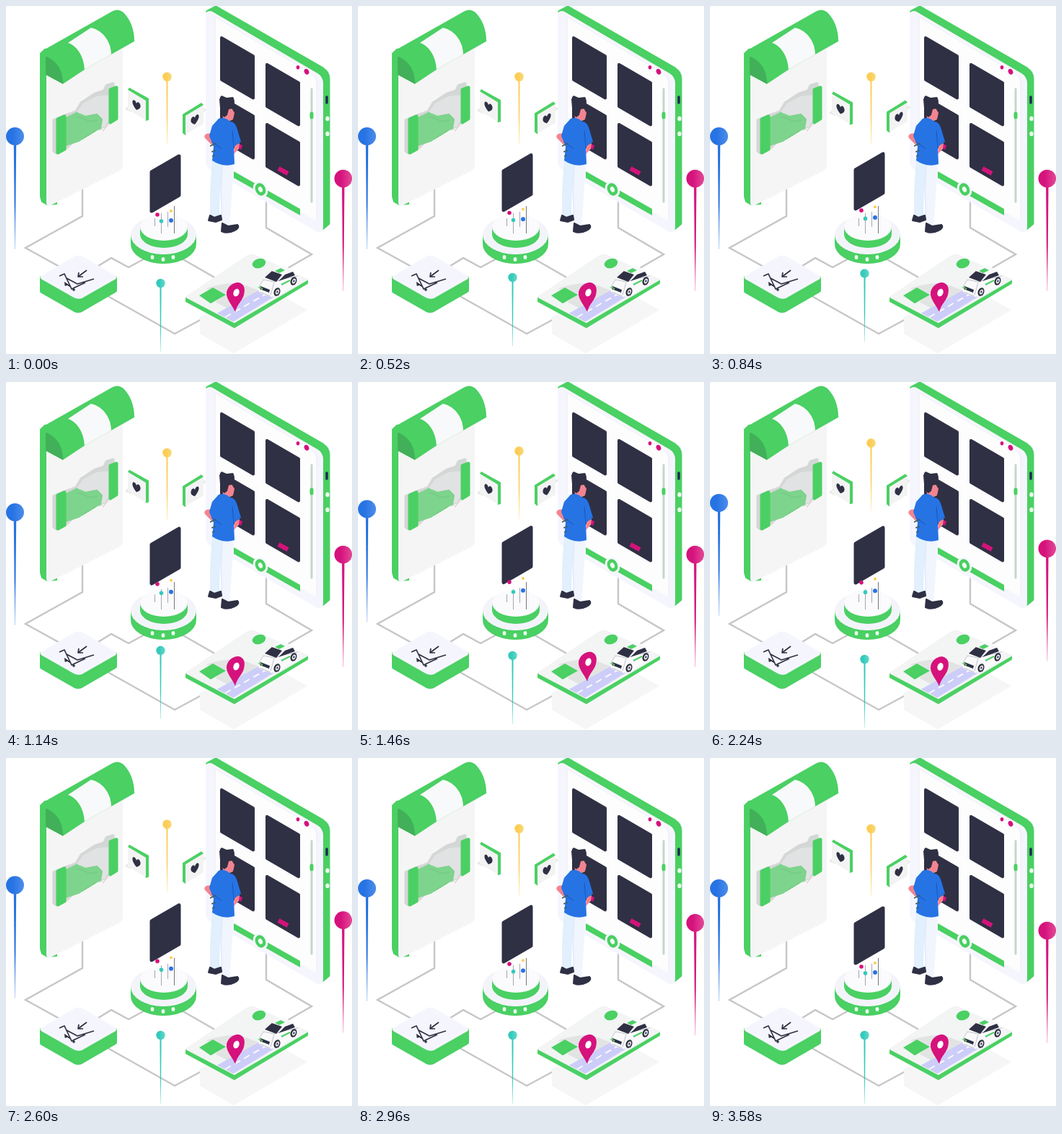
Recreate the animation shown at these times as an HTML page with a canvas. Size 480 by 482 pixels, loop 3.6 s.

```html
<!DOCTYPE html>
<html lang="en">
<head>
<meta charset="utf-8">
<title>Isometric shop</title>
<style>
html, body { margin: 0; width: 100%; height: 100%; overflow: hidden; background: #fff; }
canvas { display: block; width: 480px; height: 482px; }
</style>
</head>
<body>
<canvas id="stage" width="480" height="482"></canvas>
<script>
const ctx = document.getElementById('stage').getContext('2d');
const LOOP = 3600;
const GREEN = '#4ad063', DARK = '#2f3044', PALE = '#f5f6fd', GREY = '#c7c6c6';
const BLUE = '#2673e3', PINK = '#d6127c', TEAL = '#35cabb', YELLOW = '#fbcd55', SKIN = '#f4848f';

function fill(color, d) {
  ctx.fillStyle = color;
  ctx.fill(new Path2D(d));
}

function line(color, width, d) {
  ctx.strokeStyle = color;
  ctx.lineWidth = width;
  ctx.stroke(new Path2D(d));
}

// A filled shape whose corners are softened by a stroke of the same colour.
function soft(color, width, d) {
  ctx.lineJoin = 'round';
  fill(color, d);
  line(color, width, d);
}

function oval(color, x, y, rx, ry = rx, turn = 0) {
  ctx.fillStyle = color;
  ctx.beginPath();
  ctx.ellipse(x, y, rx, ry, turn, 0, Math.PI * 2);
  ctx.fill();
}

function shifted(dy, draw) {
  ctx.save();
  ctx.translate(0, dy);
  draw();
  ctx.restore();
}

// Smooth 0 → 1 → 0 hump that begins at start and lasts span.
function bump(t, start, span = 1800) {
  const p = (t - start) / span;
  return p > 0 && p < 1 ? Math.sin(p * Math.PI) ** 2 : 0;
}

function drawConnectors() {
  ctx.lineJoin = 'miter';
  line(GREY, 2.4, 'M106 245V291L27 335L76 362M128 360L146 349L170 362L194 349' +
    'M138 400L234 454L284 427M244 350L298 381M361 270V307L424 344L384 367');
}

function drawShop() {
  soft(GREEN, 2, 'M48 66L54 60L70 62V274L57 275L50 271L48 264Z');
  fill('#f5f5f5', 'M56 74L162 44V220Q162 225 158 228L62 276Q56 278 56 272Z');
  fill(GREEN, 'M47 66L54 60L148 7Q156 3 163 9C173 19 178 33 178 49L146 67L109 88L79 108L55 95V71Z');
  fill('#f8f9fb', 'M86 51L118 30C135 34 146 50 146 67L109 88C108 71 100 56 86 51Z');
  fill('#41b058', 'M55 70C70 75 79 89 79 108L55 95Z');
}

function drawHandshake() {
  soft('#d5d6d6', 3, 'M66 158L80 152L97 146L104 134L122 122L136 117L139 110L149 107V118L144 160L134 172L118 165L82 199L70 204L66 201Z');
  soft('#e1e2e3', 2, 'M100 146L107 136L126 126L143 124V154L137 167L121 164L105 157Z');
  soft('#7ed48c', 2, 'M82 156L98 148L110 153L126 150L133 157L131 169L119 176L101 187L82 193Z');
  line('#69c97a', 1, 'M99 153L117 160L127 158M106 184L124 173');
  line('#fff', 1.2, 'M121 178L128 173M130 175L136 169');
  soft(GREEN, 5, 'M72 157L81 153V198L72 203Z');
  soft(GREEN, 5, 'M145 116L153 113V156L145 161Z');
}

function drawTablet() {
  soft(GREEN, 5, 'M280 8L291 2L439 87Q447 92 447 101V301L436 310Z');
  soft(PALE, 6, 'M280 13Q280 8 286 11L431 96Q437 100 437 107V307Q437 313 431 309L285 224Q280 221 280 214Z');
  fill('#fdfdfe', 'M290 14L421 90Q431 96 431 105V298L408 285L290 217Z');
  line('#ebecf4', 1, 'M290 212V15L420 91Q431 97 431 107V298');
  for (const [x, y] of [[297, 41], [360, 78], [297, 124], [360, 161]]) {
    soft(DARK, 4, `M${x + 2} ${y + 3}l44 25.5v58l-44 -25.5z`);
  }
  soft(PINK, 6, 'M378 225L391 232');
  soft(PINK, 6, 'M317 191L327 196');
  oval(PINK, 405, 85, 2.3, 2.8);
  oval(PINK, 417, 91, 3.2, 4, -.4);
  fill(GREEN, 'M316 229L408 281V290L316 238Z');
  ctx.lineCap = 'round';
  line('#c3d9ca', 3, 'M424 115V271');
  line(GREEN, 5, 'M424 149V154');
  line('#1d2852', 3.4, 'M445 126V134');
  ctx.lineCap = 'butt';
  oval('#eefbf1', 446, 156, 2.7, 3.3);
  oval('#eefbf1', 446, 177, 2.7, 3.3);
  oval(PALE, 353, 254, 10, 12, -.45);
  oval(GREEN, 353, 254, 7, 9, -.45);
  oval('#f4fff6', 353, 254, 2.8, 4, -.45);
}

function drawMan() {
  fill(SKIN, 'M300 149L312 140L317 148L315 157L309 160L302 162Z');
  fill(DARK, 'M296 129L299 124L306 127L315 126Q319 132 315 142L309 143L307 151L303 154Q296 151 297 141Z');
  fill(SKIN, 'M284 176L278 177Q274 179 276 183L286 193L290 184Z');
  fill(SKIN, 'M317 193L324 190L323 198L316 205Z');
  fill('#e2effc', 'M286 211L302 217L297 254L296 291L283 290L283 258Z');
  fill('#f0f5fe', 'M299 216L316 217L314 252L310 303L300 301L298 256Z');
  line('#d3e5fa', 1, 'M300 220L298 255L300 298');
  fill(BLUE, 'M295 156Q303 153 311 160Q318 160 321 171L326 188L316 195L317 219Q301 224 286 214L288 195L282 180L286 166Z');
  line('#1b55ba', 1, 'M314 172L316 195M287 189L298 197');
  line('#47605f', 1.8, 'M283 194L292 190M285 202L291 200M286 208L290 207');
  soft(DARK, 2, 'M283 290L289 293L298 290L299 296L291 299L281 297Z');
  soft(DARK, 2, 'M300 301L308 305L321 303Q325 307 317 311Q307 316 299 312Z');
}

function drawHeart(x, y, slope) {
  ctx.save();
  ctx.transform(1, slope, 0, 1, x, y);
  fill(DARK, 'M0 7C-4 4 -6 1 -5.5 -2C-5 -6 -1 -6 0 -2C1 -6 5 -6 5.5 -2C6 1 4 4 0 7Z');
  ctx.restore();
}

function drawBubbles(wave) {
  shifted(6 * wave, () => {
    fill('#e9e9ea', 'M171 137L165 143L174 147Z');
    fill(GREEN, 'M169 116L171 113L198 128V158L194 159Z');
    fill('#f3f3f3', 'M169 116L194 131V158L169 143Z');
    drawHeart(181, 137, .5);
  });
  shifted(-4 * wave, () => {
    fill('#e9e9ea', 'M272 141L278 143L272 150Z');
    fill(GREEN, 'M245 150L271 134L274 137L249 179L245 176Z');
    fill('#f3f3f3', 'M249 152L274 137V163L249 178Z');
    drawHeart(262, 157, -.5);
  });
}

function drawDisc(x, top, rx, ry, depth, color) {
  oval(GREEN, x, top + depth, rx, ry);
  ctx.fillRect(x - rx, top, rx * 2, depth);
  oval(color, x, top, rx, ry);
}

function drawPlatform(wave) {
  drawDisc(218.5, 317, 45.5, 27, 13, '#f3f4fa');
  for (const [x, y] of [[203, 348], [218, 351], [232, 348]]) oval('#e9fcec', x, y, 2.4, 3);
  drawDisc(219, 306, 33, 19, 10, '#fbfbfe');
  line('#a7a7ac', 1, 'M206.5 294V305M215.5 287V315M224.5 285V306');
  line('#77777d', 1, 'M233.5 277V315');
  shifted(-3.5 * wave, () => soft(DARK, 5, 'M202 230L240 208V262L202 284Z'));
  oval(PINK, 210, 289 - 6.5 * wave, 2.8);
  oval(TEAL, 215.5, 298 - 4 * wave, 2.8);
  oval(BLUE, 229, 297 - 4.5 * wave, 3);
  oval(YELLOW, 229, 284 - 6.5 * wave, 2);
}

function drawCartBox() {
  soft(GREEN, 6, 'M50 377L100 395L151 377V394L106 420Q100 424 94 420L50 395Z');
  soft(PALE, 6, 'M51 376L95 350Q100 347 106 350L150 376L106 401Q100 404 95 401Z');
  line(DARK, 1.7, 'M74 374L81 371L91 392L110 383M84 377L99 385L122 378M81 383L90 389');
  line(DARK, 1.7, 'M112 366L100 375M101 369L100 375L107 375');
  oval(DARK, 83, 386, 1.8);
  oval(DARK, 94, 393, 1.8);
}

function drawCard() {
  fill('#f6f6f6', 'M269 430L370 394L418 421L316 481L269 454Z');
  soft(GREEN, 2, 'M250 404L317 438L418 379V384L317 445L250 409Z');
  soft('#f3f4f4', 2, 'M250 403L335 346Q340 343 346 346L418 379L317 438Z');
  ctx.save();
  ctx.clip(new Path2D('M250 403L340 343L418 379L317 438Z'));
  fill('#e2e4e3', 'M277 391Q318 378 340 390L364 398L320 425L290 410L305 400Z');
  fill('#cccdf8', 'M290 427L356 391L373 402L314 438Z');
  ctx.setLineDash([9, 6]);
  line('#fff', 1.8, 'M304 431L364 397');
  ctx.setLineDash([]);
  ctx.restore();
  fill(GREEN, 'M268 401L287 390L305 400L284 412Z');
  oval(GREEN, 351, 356.5, 9.5, 6.5, -.3);
}

function drawCar() {
  soft('#fafafb', 2, 'M350 391L357 379L364 376L372 364L384 361L398 366L405 374L404 383L379 400L368 402L352 396Z');
  line('#b9bcc2', .9, 'M350 391L357 379L372 382L386 378L405 374M372 383L367 400M352 396L367 402');
  fill(DARK, 'M359 376L369 367L383 372L375 382Z');
  fill(DARK, 'M378 381L387 372L398 368L401 373Z');
  fill('#f8f8fa', 'M369 367L381 361L396 366L384 372Z');
  fill(GREEN, 'M373 367L381 363L387 366L379 370Z');
  fill(DARK, 'M353 388L366 393L365 397L352 392Z');
  line(GREEN, 2, 'M351 389L356 392M382 386L394 380');
  for (const [x, y] of [[376, 396], [399, 381]]) {
    oval(DARK, x, y, 4.3, 6, .35);
    oval('#e6e7ea', x + .4, y, 2.4, 3.6, .35);
    oval(DARK, x + .4, y, 1, 1.5, .35);
  }
}

function drawMarker() {
  fill(PINK, 'M318 424C314 414 305 406 306 397C307 389 315 382 323 383C331 385 332 392 330 400C328 408 320 414 318 424Z');
  oval('#fff', 319.5, 397, 4, 5.5, .35);
}

function drawPin({ x, y, r, end, color, light, start, rise }, t) {
  shifted(-rise * bump(t, start), () => {
    const fade = ctx.createLinearGradient(0, y, 0, end);
    fade.addColorStop(0, color);
    fade.addColorStop(.6, color);
    fade.addColorStop(1, color + '55');
    const w = r > 10 ? 1.8 : 1.1;
    fill(fade, `M${x - w} ${y}H${x + w}L${x + .4} ${end}H${x - .4}Z`);
    const shade = ctx.createLinearGradient(x - r, 0, x + r, 0);
    shade.addColorStop(.35, color);
    shade.addColorStop(1, light);
    oval(shade, x, y, r);
  });
}

const pins = [
  { x: 12.5, y: 180.5, r: 12.5, end: 337, color: '#2673e3', light: '#4d8deb', start: 1130, rise: 15 },
  { x: 223.5, y: 98, r: 6.3, end: 192, color: '#fbcd55', light: '#fad778', start: 1220, rise: 14 },
  { x: 467.8, y: 239, r: 12.3, end: 395, color: '#d6127c', light: '#e24a98', start: 1750, rise: 14.5 },
  { x: 214.5, y: 384, r: 6.2, end: 479, color: '#35cabb', light: '#62d8cb', start: 30, rise: 14 }
];

function draw(t) {
  const wave = 1 - Math.cos(t / LOOP * Math.PI * 2);
  ctx.fillStyle = '#fff';
  ctx.fillRect(0, 0, 480, 482);
  drawConnectors();
  drawShop();
  drawHandshake();
  drawTablet();
  drawMan();
  drawBubbles(wave);
  drawPlatform(wave);
  drawCartBox();
  drawCard();
  drawCar();
  shifted(-11 * bump(t, 850, 1660), drawMarker);
  for (const pin of pins) drawPin(pin, t);
}

const began = performance.now();
function tick() {
  draw((performance.now() - began) % LOOP);
  requestAnimationFrame(tick);
}
tick();
</script>
</body>
</html>
```
